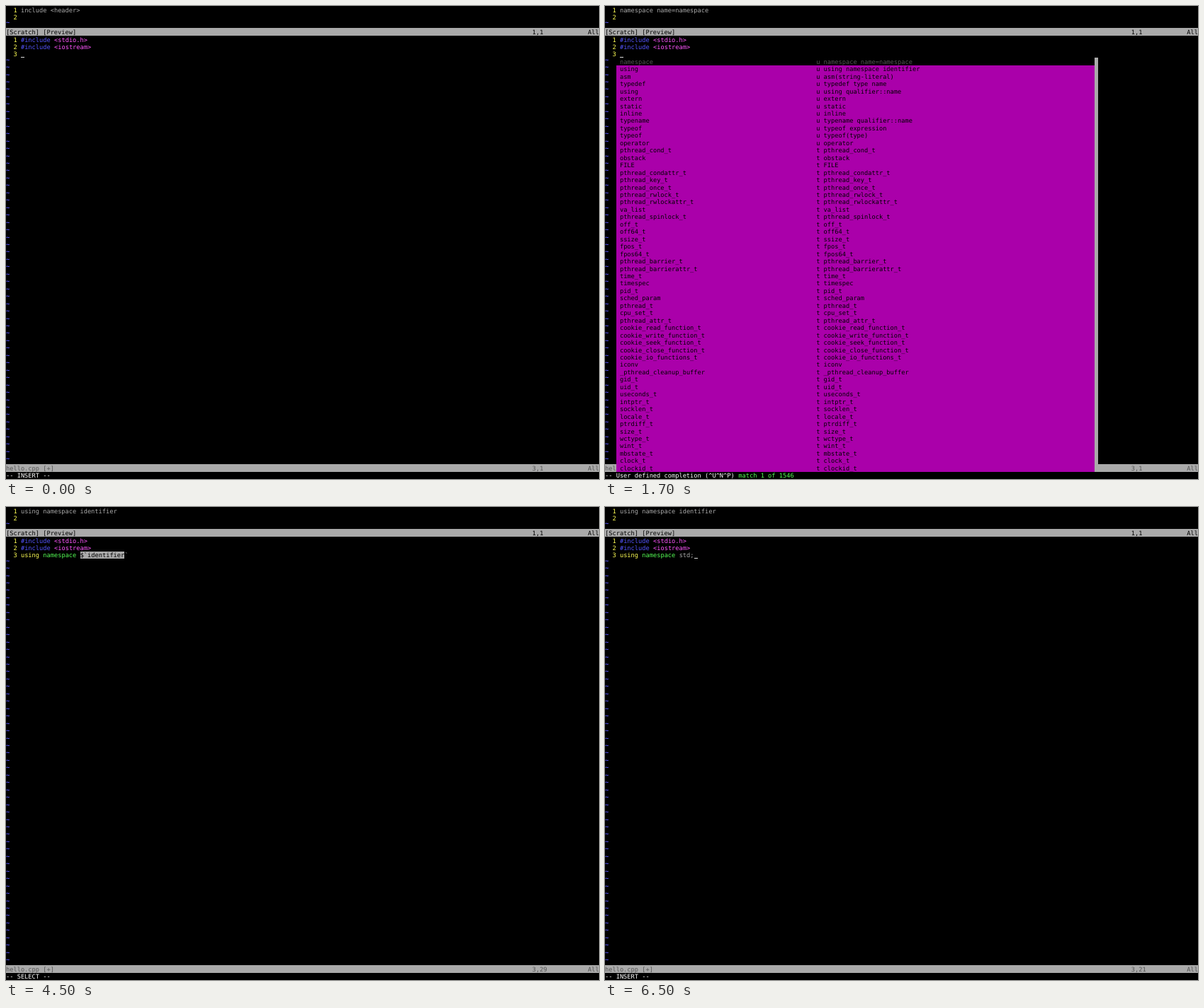
An HTML page that plays this animation: 837 by 669 pixels, repeating every 8000 ms.

```html
<!DOCTYPE html>
<html lang="en">
<head>
<meta charset="utf-8">
<title>Editor completion</title>
<style>
html, body { margin: 0; width: 100%; height: 100%; overflow: hidden; background: #000; }
svg { display: block; width: 837px; height: 669px; }
text { font-family: "DejaVu Sans Mono", monospace; font-size: 8.689px; white-space: pre; text-rendering: geometricPrecision; }
.tilde { font-weight: bold; }
</style>
</head>
<body>
<svg id="screen" viewBox="0 0 837 669"></svg>
<script>
const W = 837 / 160, H = 669 / 64, BASE = 8.7, LOOP = 8000;
const GREY = '#aaa', DARK = '#555', BLUE = '#55f', PINK = '#f5f',
      YELLOW = '#ff5', GREEN = '#5f5', PURPLE = '#a0a';
const screen = document.getElementById('screen');

// "word|signature" for keywords, plain names for types
const keywords = `namespace|namespace name=namespace
using|using namespace identifier
asm|asm(string-literal)
typedef|typedef type name
using|using qualifier::name
extern|extern
static|static
inline|inline
typename|typename qualifier::name
typeof|typeof expression
typeof|typeof(type)
operator|operator`.split('\n').map(s => s.split('|'));

const types = `pthread_cond_t obstack FILE pthread_condattr_t pthread_key_t pthread_once_t
pthread_rwlock_t pthread_rwlockattr_t va_list pthread_spinlock_t off_t off64_t ssize_t fpos_t
fpos64_t pthread_barrier_t pthread_barrierattr_t time_t timespec pid_t sched_param pthread_t
cpu_set_t pthread_attr_t cookie_read_function_t cookie_write_function_t cookie_seek_function_t
cookie_close_function_t cookie_io_functions_t iconv _pthread_cleanup_buffer gid_t uid_t
useconds_t intptr_t socklen_t locale_t ptrdiff_t size_t wctype_t wint_t mbstate_t clock_t
clockid_t`.split(/\s+/);

const items = [...keywords.map(([w, s]) => [w, 'u ' + s]), ...types.map(w => [w, 't ' + w])];

const PREVIEW = 'using namespace identifier';
const scenes = [
  { start: 0, preview: 'include <header>', code: [], cursor: 4, pos: '3,1', mode: 'INSERT' },
  { start: 500, preview: 'namespace name=namespace', code: [], cursor: 4, pos: '3,1', pick: 0 },
  { start: 2500, preview: PREVIEW, code: ['$`identifier`'], cursor: 33, pos: '3,1', pick: 1 },
  { start: 4500, preview: PREVIEW, code: ['$`identifier', '`'], select: true, pos: '3,29', mode: 'SELECT' },
  { start: 6500, preview: PREVIEW, code: ['std;'], cursor: 24, pos: '3,21', mode: 'INSERT' }
];

function add(tag, attrs) {
  const el = document.createElementNS('http://www.w3.org/2000/svg', tag);
  for (const key in attrs) el.setAttribute(key, attrs[key]);
  return screen.appendChild(el);
}

// Cell rectangles snap to whole pixels
function box(col, row, cols, rows, fill) {
  const x = Math.round(col * W), y = Math.round(row * H);
  const width = Math.round((col + cols) * W) - x;
  const height = Math.round((row + rows) * H) - y;
  add('rect', { x, y, width, height, fill });
}

function print(col, row, str, fill) {
  add('text', { x: col * W, y: row * H + BASE, fill }).textContent = str;
}

function tilde(row) {
  add('text', { x: 0, y: row * H + 5.5, fill: BLUE, class: 'tilde' }).textContent = '~';
}

function status(row, name, pos, fill) {
  box(0, row, 160, 1, GREY);
  print(0, row, name, fill);
  print(142, row, pos, fill);
  print(157, row, 'All', fill);
}

function menu(pick) {
  box(3, 7, 129, items.length, PURPLE);
  box(132, 7, 1, items.length, GREY);
  box(3, 7 + pick, 129, 1, '#000');
  items.forEach(([word, info], i) => {
    const fill = i === pick ? DARK : '#000';
    print(4, 7 + i, word, fill);
    print(57, 7 + i, info, fill);
  });
}

function draw(s) {
  screen.replaceChildren();

  [0, 1, 4, 5, 6].forEach((row, i) => print(2, row, [1, 2, 1, 2, 3][i], YELLOW));
  tilde(2);
  for (let row = 7; row < 62; row++) tilde(row);
  print(4, 0, s.preview, GREY);
  status(3, '[Scratch] [Preview]', '1,1', '#000');

  ['<stdio.h>', '<iostream>'].forEach((header, i) => {
    print(4, 4 + i, '#include', BLUE);
    print(13, 4 + i, header, PINK);
  });
  if (s.code.length) {
    print(4, 6, 'using', YELLOW);
    print(10, 6, 'namespace', GREEN);
    if (s.select) box(20, 6, 12, 1, GREY);
    print(20, 6, s.code[0], s.select ? '#000' : GREY);
    if (s.code[1]) print(32, 6, s.code[1], GREY);
  }
  if (s.cursor) box(s.cursor, 6.875, 1, 0.125, '#ddd');

  status(62, 'hello.cpp [+]', s.pos, DARK);
  if (s.mode) {
    print(0, 63, `-- ${s.mode} --`, '#fff');
  } else {
    menu(s.pick);
    print(0, 63, '-- User defined completion (^U^N^P)', '#fff');
    print(36, 63, `match ${s.pick + 1} of 1546`, GREEN);
  }
}

let shown;
const begin = performance.now();
function tick() {
  const t = (performance.now() - begin) % LOOP;
  const scene = scenes.findLast(s => s.start <= t);
  if (scene !== shown) draw(shown = scene);
  requestAnimationFrame(tick);
}
tick();
</script>
</body>
</html>
```
